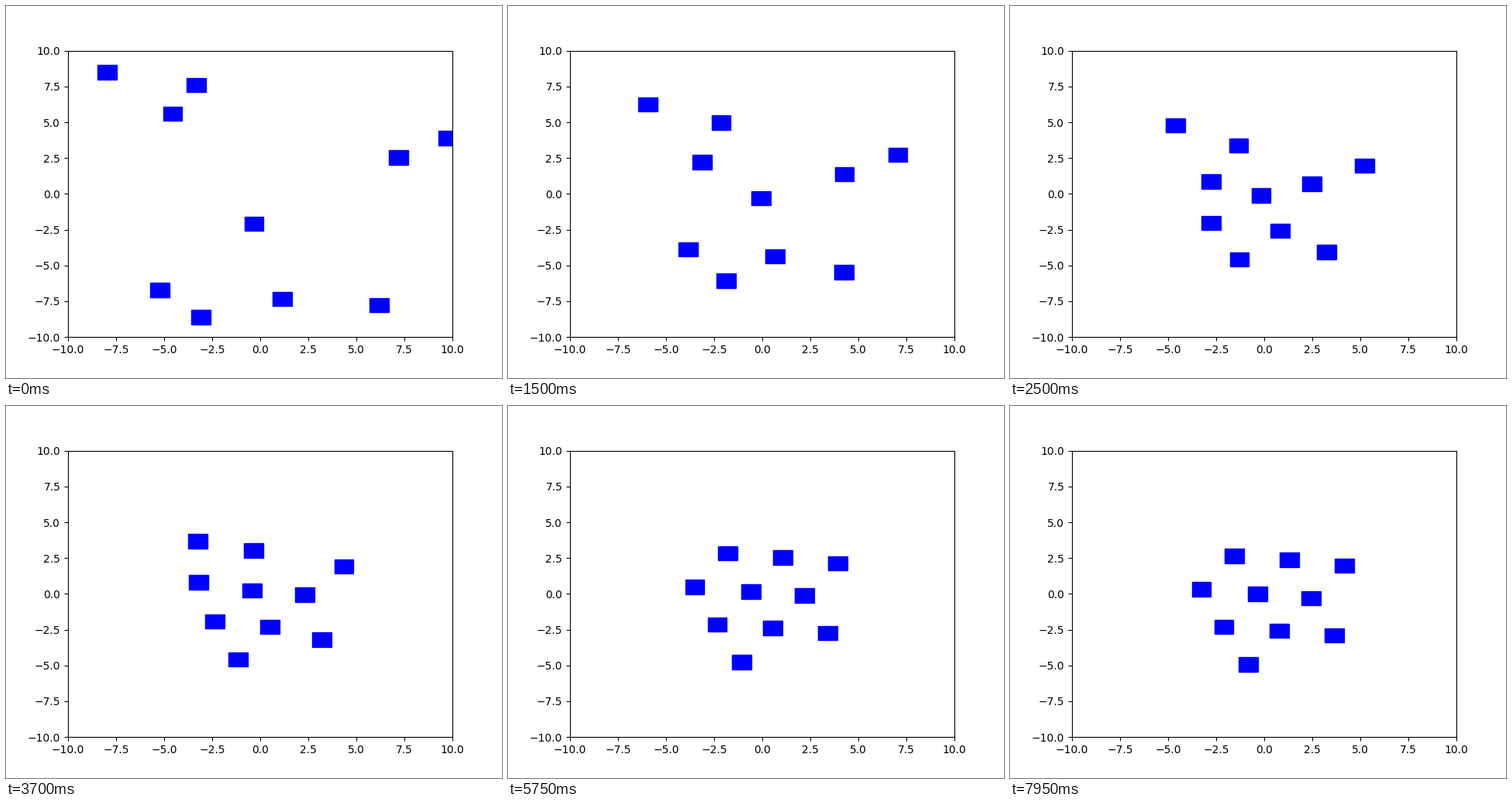
A matplotlib script that plays this animation: 640 px wide and 480 px high, repeating every 8 s.

```python
import numpy as np
import matplotlib.pyplot as plt
from matplotlib.animation import FuncAnimation
from matplotlib.patches import Rectangle

FRAMES, INTERVAL = 160, 50
SIZE = 1.0
SPEED = 0.1   # step towards the group's centre
GAP = 3.0     # preferred distance between squares
PUSH = 0.5    # share of the missing gap regained per step

START = [(-7.96, 8.48), (9.78, 3.89), (7.20, 2.53), (-4.56, 5.60),
         (-3.33, 7.59), (-0.32, -2.09), (-5.22, -6.72), (-3.10, -8.62),
         (1.15, -7.33), (6.19, -7.76)]


def unit(v):
    return v / max(np.hypot(*v), 1e-9)


def step(points):
    """Move the squares one after another, each seeing the earlier moves."""
    points = points.copy()
    for i, here in enumerate(points):
        move = SPEED * unit(points.mean(axis=0) - here)
        for other in np.delete(points, i, axis=0):
            away = here - other
            lack = GAP - np.hypot(*away)
            if lack > 0:
                move += PUSH * lack * unit(away)
        points[i] = here + move
    return points


def simulate():
    states = [np.array(START)]
    while len(states) < FRAMES:
        states.append(step(states[-1]))
    return states


fig, ax = plt.subplots(figsize=(6.4, 4.8), dpi=100)
ax.set_xlim(-10, 10)
ax.set_ylim(-10, 10)

states = simulate()
squares = [ax.add_patch(Rectangle((0, 0), SIZE, SIZE, color="blue", lw=1))
           for _ in START]


def update(frame):
    for square, centre in zip(squares, states[frame]):
        square.set_xy(centre - SIZE / 2)
    return squares


anim = FuncAnimation(fig, update, frames=FRAMES, interval=INTERVAL,
                     repeat=True, repeat_delay=0, blit=False)
plt.show()
```
